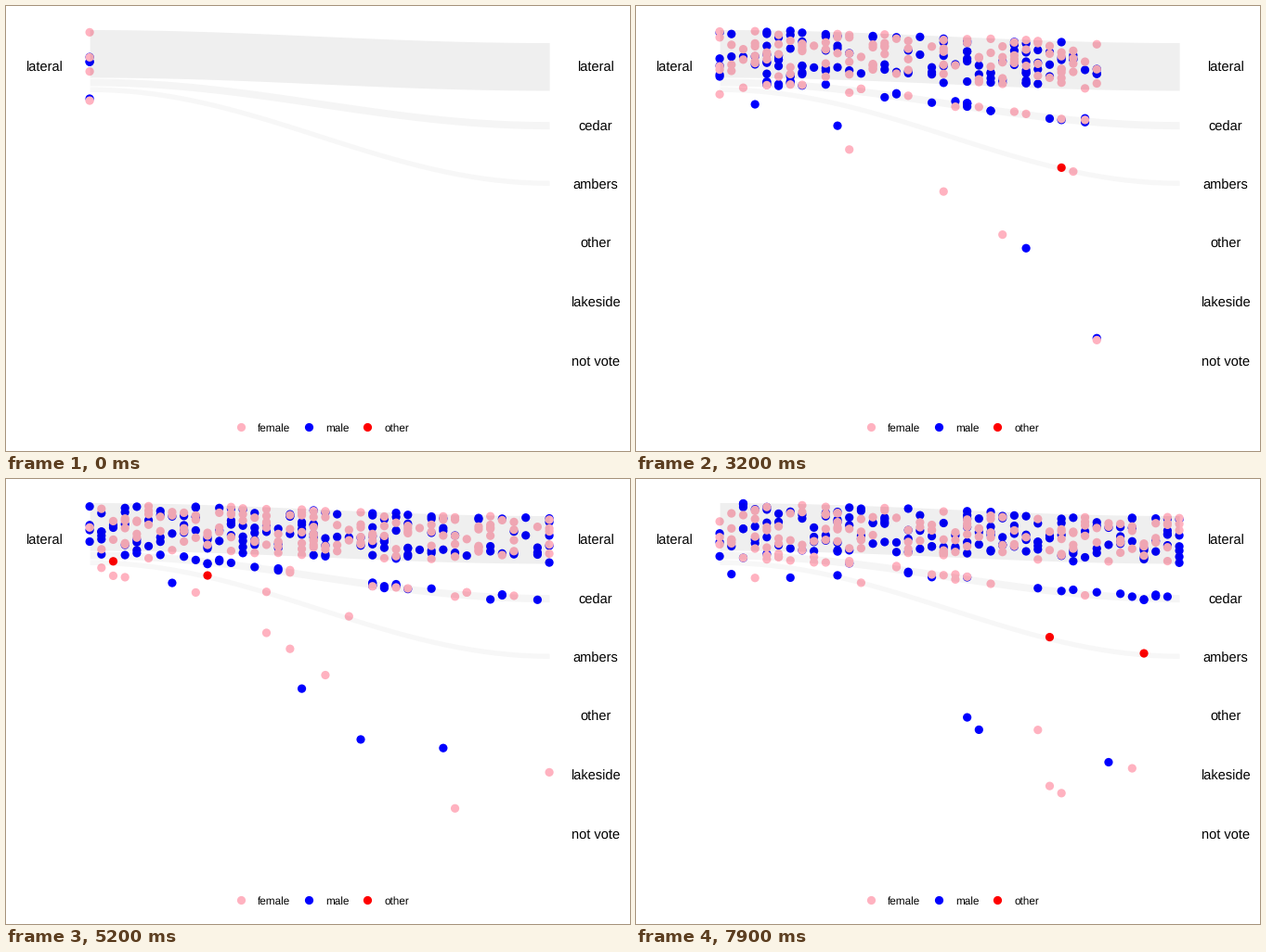
Write a matplotlib script that moves like this. It is 672 px wide and 480 px high and loops after 8 s.

```python
import numpy as np
import matplotlib.pyplot as plt
from matplotlib.animation import FuncAnimation

W, H, DPI = 672, 480, 96
X0, X1, STEPS = 90.1, 585.1, 39  # journey of one dot, one step per frame
FRAMES, INTERVAL = 80, 100
PAUSE = 74                       # the flow halts for one frame here

plt.rcParams["font.family"] = "Liberation Sans"
plt.rcParams["text.hinting"] = "none"

MALE, FEMALE, OTHER = range(3)
SEX_RGB = np.array([[0, 0, 255], [255, 178, 192], [255, 0, 0]]) / 255
MALE_SHARE = 0.53

# route: top and bottom at the left, drop to the right, dots per frame, shade
ROUTES = {
    "lateral": (25.5, 77, 14, 7.5, 0.064),
    "cedar": (78, 86, 46.6, 1.0, 0.041),
    "ambers": (87, 92.5, 101, 0.09, 0.032),
    "lakeside": (92, 96, 223.5, 0, 0),
    "not vote": (98.5, 104, 280, 0, 0),
}

# start frames of the few dots that stand alone
LONE = {
    ("ambers", OTHER): (3, 42, 50),
    ("lakeside", MALE): (6, 22, 45, 72),
    ("lakeside", FEMALE): (8, 13, 32, 35, 37, 43, 51),
    ("not vote", MALE): (0, 29, 34, 56, 57, 77),
    ("not vote", FEMALE): (0, 21, 49, 50, 75),
}


def build_dots(seed=12):
    """Rows of birth, start height, sex and drop."""
    rng = np.random.default_rng(seed)
    rows = []

    def add(route, birth, sex):
        top, bottom, drop = ROUTES[route][:3]
        rows.append((birth, rng.uniform(top + 0.5, bottom - 0.5), sex, drop))

    for route, (_, _, _, rate, _) in ROUTES.items():
        for birth, count in enumerate(rng.poisson(rate, FRAMES)):
            for _ in range(count):
                add(route, birth, MALE if rng.random() < MALE_SHARE else FEMALE)
    for (route, sex), births in LONE.items():
        for birth in births:
            add(route, birth, sex)
    rows.sort(key=lambda r: r[2])    # males below, females above
    return np.array(rows, float).T


def ease(u):
    return (1 - np.cos(np.pi * u)) / 2


birth, start, sex, drop = build_dots()
colors = SEX_RGB[sex.astype(int)]

fig = plt.figure(figsize=(W / DPI, H / DPI), dpi=DPI, facecolor="white")
ax = fig.add_axes([0, 0, 1, 1])
ax.set(xlim=(0, W), ylim=(H, 0))
ax.axis("off")

DOT = (9.2 * 72 / DPI) ** 2
dots = ax.scatter([], [], s=DOT, linewidths=0, zorder=2)

# translucent ribbons lie over the dots
u = np.linspace(0, 1, 120)
for top, bottom, fall, _, shade in ROUTES.values():
    if shade:
        ax.fill_between(X0 + (X1 - X0) * u, top + fall * ease(u),
                        bottom + fall * ease(u), color="black", alpha=shade,
                        linewidth=0, zorder=3)


def label(x, y, text, size=11, ha="center"):
    ax.text(x, y, text, fontsize=size, ha=ha, va="baseline", color="black",
            zorder=4)


label(40.5, 71, "lateral")
names = ("lateral", "cedar", "ambers", "other", "lakeside", "not vote")
for i, name in enumerate(names):
    label(634.7, 71 + 63.4 * i, name)

for x, name, s in ((252.7, "female", FEMALE), (325.7, "male", MALE),
                   (388.7, "other", OTHER)):
    ax.scatter([x], [453.8], s=DOT, color=[SEX_RGB[s]], linewidths=0)
    label(x + 18.3, 458.7, name, 8.8, "left")


def update(frame):
    age = frame - (frame >= PAUSE) - birth
    on = (age >= 0) & (age <= STEPS)
    t = age[on] / STEPS
    dots.set_offsets(np.column_stack([X0 + (X1 - X0) * t,
                                      start[on] + drop[on] * ease(t)]))
    dots.set_facecolors(colors[on])
    return (dots,)


anim = FuncAnimation(fig, update, frames=FRAMES, interval=INTERVAL,
                     repeat=True, repeat_delay=0)
plt.show()
```
